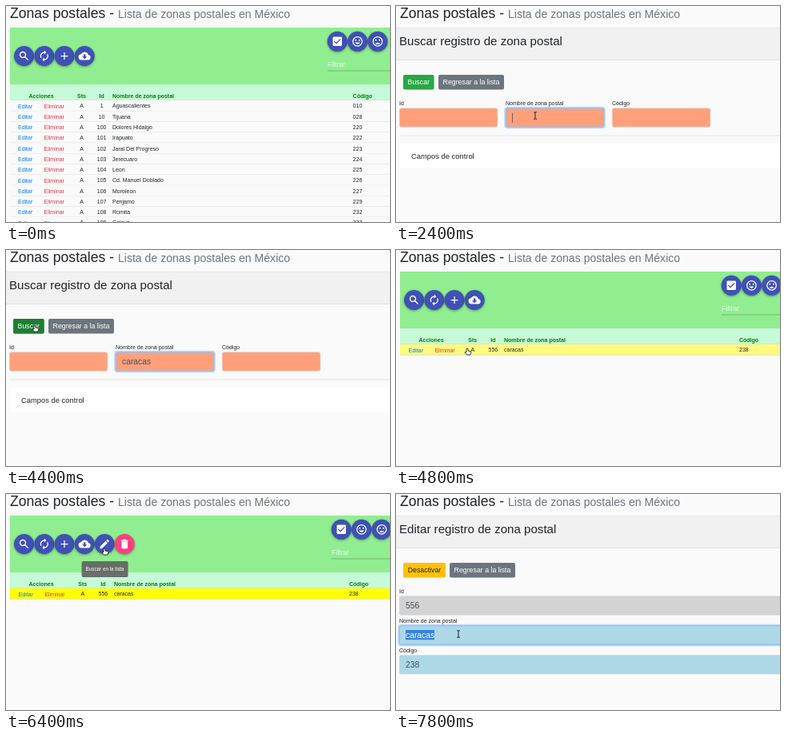
An HTML page that plays this animation: 480 by 270 pixels, repeating every 8000 ms.

```html
<!DOCTYPE html>
<html lang="es">
<head>
<meta charset="utf-8">
<title>Zonas postales</title>
<style>
html, body { margin: 0; height: 100%; overflow: hidden; background: #fafafa; }
svg { display: block; width: 100vw; height: 100vh; font: 7px "Liberation Sans", Arial, sans-serif; fill: #212529; }
.mid { text-anchor: middle; }
.head { font-weight: bold; fill: #008000; }
.edit { fill: #007bff; }
.drop { fill: #dc3545; }
.value { font-size: 10.3px; fill: #495057; }
.button { font-size: 8.8px; }
.fab { filter: drop-shadow(0 1.5px 1.5px #0006); }
.focus { fill: none; stroke: #80bdff; }
.ring { fill: none; stroke: #007bff40; stroke-width: 2; }

/* One shared 8 s loop: 1% = 80 ms */
.cut { opacity: 0; animation: 8s step-end infinite; }
.fade { opacity: 0; animation: 8s linear infinite; }
#all { animation-name: all; }
#search { animation-name: search; }
#found { animation-name: found; }
#editor { animation-name: editor; }
@keyframes all { 0% { opacity: 1 } 20%, 100% { opacity: 0 } }
@keyframes search { 0% { opacity: 0 } 20% { opacity: 1 } 56.25%, 100% { opacity: 0 } }
@keyframes found { 0% { opacity: 0 } 56.25% { opacity: 1 } 81.25%, 100% { opacity: 0 } }
@keyframes editor { 0% { opacity: 0 } 81.25%, 100% { opacity: 1 } }

.tip1 { animation-name: tip1; }
.tip2 { animation-name: tip2; }
.pressed { animation-name: pressed; }
.nameFocus { animation-name: nameFocus; }
.caret { animation-name: caret; }
.submit { animation-name: submit; }
.tools { animation-name: tools; }
.editFocus { animation-name: editFocus; }
.selection { animation-name: selection; }
@keyframes tip1 { 0%, 11.5% { opacity: 0 } 13%, 100% { opacity: 1 } }
@keyframes tip2 { 0%, 76% { opacity: 0 } 78%, 100% { opacity: 1 } }
@keyframes pressed { 0%, 13.5% { opacity: 0 } 14.5%, 100% { opacity: 1 } }
@keyframes nameFocus { 0%, 28.8% { opacity: 0 } 30%, 100% { opacity: 1 } }
@keyframes caret { 0% { opacity: 0 } 29% { opacity: 1 } 35.8%, 100% { opacity: 0 } }
@keyframes submit { 0%, 48.5% { opacity: 0 } 50.5%, 100% { opacity: 1 } }
@keyframes tools { 0%, 63.5% { opacity: 0 } 65%, 100% { opacity: 1 } }
@keyframes editFocus { 0%, 94% { opacity: 0 } 96%, 100% { opacity: 1 } }
@keyframes selection { 0% { opacity: 0 } 95.8%, 100% { opacity: 1 } }

.typed { fill-opacity: 0; animation: typed 8s step-end infinite; }
@keyframes typed { 0% { fill-opacity: 1 } 60%, 100% { fill-opacity: 0 } }

.row { animation: row 8s linear infinite; }
@keyframes row {
  0%, 59% { fill: #fafafa }
  60%, 70.5% { fill: #fffa7d }
  72%, 100% { fill: #ff0 }
}

#pointer { animation: move 8s ease-in-out infinite; }
@keyframes move {
  0%, 3.3% { transform: translate(112px, 280px) }
  11.3%, 14.1% { transform: translate(24px, 64px) }
  17%, 22% { transform: translate(73.5px, 84px) }
  24%, 25% { transform: translate(71px, 95px) }
  29%, 45.8% { transform: translate(174px, 137px) }
  49.1%, 58.2% { transform: translate(36px, 94px) }
  59.8%, 70% { transform: translate(89px, 123px) }
  75%, 85% { transform: translate(123px, 68px) }
  90.5%, 100% { transform: translate(78px, 175px) }
}
#arrow { animation-name: arrow; }
#hand { animation-name: hand; }
#beam { animation-name: beam; }
@keyframes arrow { 0% { opacity: 1 } 10.5% { opacity: 0 } 81.25% { opacity: 1 } 89.5%, 100% { opacity: 0 } }
@keyframes hand { 0% { opacity: 0 } 10.5% { opacity: 1 } 27.5% { opacity: 0 } 48% { opacity: 1 } 81.25%, 100% { opacity: 0 } }
@keyframes beam { 0% { opacity: 0 } 27.5% { opacity: 1 } 48% { opacity: 0 } 89.5%, 100% { opacity: 1 } }
</style>
</head>
<body>
<svg viewBox="0 0 480 270" preserveAspectRatio="none">
  <defs>
    <g id="find" fill="none" stroke="#fff" stroke-width="2.2"><circle cx="9.5" cy="9.5" r="5.5"/><path d="M13.5 13.5l6.3 6.3"/></g>
    <path id="renew" d="M12 6v3l4-4-4-4v3c-4.42 0-8 3.58-8 8 0 1.57.46 3.03 1.24 4.26L6.7 14.8A6 6 0 0 1 12 6zm6.76 1.74L17.3 9.2A6 6 0 0 1 12 18v-3l-4 4 4 4v-3c4.42 0 8-3.58 8-8 0-1.57-.46-3.03-1.24-4.26z"/>
    <path id="add" d="M19 13h-6v6h-2v-6H5v-2h6V5h2v6h6z"/>
    <path id="cloud" d="M19.35 10.04A7.5 7.5 0 0 0 5.35 8.04 6 6 0 0 0 6 20h13a5 5 0 0 0 .35-9.96zM17 13l-5 5-5-5h3V9h4v4z"/>
    <path id="check" d="M19 3H5a2 2 0 0 0-2 2v14a2 2 0 0 0 2 2h14a2 2 0 0 0 2-2V5a2 2 0 0 0-2-2zm-9 14l-5-5 1.4-1.4 3.6 3.6 7.6-7.6L19 8z"/>
    <g id="face"><circle cx="12" cy="12" r="9" fill="none" stroke="#fff" stroke-width="2"/><circle cx="8.5" cy="9.5" r="1.5"/><circle cx="15.5" cy="9.5" r="1.5"/></g>
    <g id="happy"><use href="#face"/><path d="M7 14a5.5 5.5 0 0 0 10 0z"/></g>
    <g id="sad"><use href="#face"/><path d="M7 17.5a5.5 5.5 0 0 1 10 0z"/></g>
    <path id="pencil" d="M3 17.25V21h3.75L17.8 9.94 14.06 6.2zM20.7 7.04a1 1 0 0 0 0-1.4L18.37 3.3a1 1 0 0 0-1.4 0l-1.84 1.83 3.75 3.75z"/>
    <path id="bin" d="M6 19a2 2 0 0 0 2 2h8a2 2 0 0 0 2-2V7H6zM19 4h-3.5l-1-1h-5l-1 1H5v2h14z"/>
  </defs>
  <rect width="480" height="270" fill="#fafafa"/>
  <text x="5" y="15" font-size="17.6">Zonas postales - <tspan font-size="14.08" fill="#6c757d">Lista de zonas postales en México</tspan></text>
  <g id="all" class="cut"></g>
  <g id="search" class="cut"></g>
  <g id="found" class="cut"></g>
  <g id="editor" class="cut"></g>
  <g id="pointer" stroke-linejoin="round">
    <path id="arrow" class="cut" d="M0 0v8l2-1.8 1.3 3 1.3-.6-1.3-2.9H6z" fill="#222" stroke="#fff" stroke-width=".6"/>
    <path id="hand" class="cut" d="M-1 .6Q0-.6 1 .6V3l3.4.8Q5 4 4.8 5L4 8H-.6L-3 5q0-1.2 2 0z" fill="#fff" stroke="#222" stroke-width=".9"/>
    <path id="beam" class="cut" d="M-2-4.2h1.4L0-3.6l.6-.6H2M0-3.6v7.2M-2 4.2h1.4L0 3.6l.6.6H2" fill="none" stroke="#333" stroke-width="1.1"/>
  </g>
</svg>
<script>
const text = (x, y, content, attrs = '') => `<text x="${x}" y="${y}" ${attrs}>${content}</text>`;
const rect = (x, y, w, h, fill, attrs = '') =>
  `<rect x="${x}" y="${y}" width="${w}" height="${h}" fill="${fill}" ${attrs}/>`;
const line = (x, y, color) => rect(x, y - .4, 480 - x, .8, color);

const fab = (x, y, icon, color = '#3f51b5') =>
  `<circle class="fab" cx="${x}" cy="${y}" r="12.5" fill="${color}"/>
   <use href="#${icon}" fill="#fff" transform="translate(${x - 7.6} ${y - 7.6}) scale(.635)"/>`;

const tooltip = (x, name) => `<g class="fade ${name}">
  ${rect(x - 29, 84, 58, 20, '#616161e8', 'rx="2"')}
  ${text(x, 96.2, 'Buscar en la lista', 'class="mid" font-size="6.3" fill="#fff"')}</g>`;

const button = (x, w, label, fill, color = '#fff', shade = '') =>
  rect(x, 86, w, 18.4, fill, 'rx="2"') + shade +
  text(x + w / 2, 98.2, label, `class="button mid" fill="${color}"`);

const field = (x, y, w, label, fill, value = '') =>
  text(x, y - 3.8, label) +
  rect(x + .3, y + .3, w, 23.4, fill, 'rx="2.2" stroke="#ced4da" stroke-width=".6"') +
  text(x + 8, y + 15.6, value, 'class="value"');

const focusRing = (x, y, w, name) => `<g class="fade ${name}">
  <rect class="ring" x="${x - .8}" y="${y - .8}" width="${w + 2}" height="25.6" rx="3"/>
  <rect class="focus" x="${x + .3}" y="${y + .3}" width="${w}" height="23.4" rx="2.2"/></g>`;

const heading = title => rect(0, 27, 480, 40.5, '#f1f1f1') + line(0, 27.2, '#e4e4e4') +
  line(0, 67.5, '#d8d8d8') + text(4, 49, title, 'font-size="15.1"');

// Both lists share a layout; the columns sit a little differently.
function list(rows, { sts, id, name, code, link, filter }, rowClass = '') {
  const tableRow = ([key, zone, number], i) => {
    const y = 118 + 13.28 * i, base = y + 9.6;
    return rect(5, y, 475, 13.28, '#fafafa', `class="${rowClass}"`) + line(5, y + 13.28, '#d9d9d9') +
      text(link, base, 'Editar', 'class="edit"') + text(link + 32.6, base, 'Eliminar', 'class="drop"') +
      text(sts, base - .2, 'A', 'class="mid"') + text(id, base - .2, key, 'class="mid"') +
      text(name, base - .2, zone) + text(code, base - .2, number);
  };
  return rect(5, 27, 475, 71, '#90ee90') + rect(5, 98, 475, 20, '#c6fad8') +
    line(5, 118, '#cfd8d2') +
    ['find', 'renew', 'add', 'cloud'].map((icon, i) => fab(22.6 + 25.2 * i, 62.5, icon)).join('') +
    ['check', 'happy', 'sad'].map((icon, i) => fab(filter + 12.2 + 25.2 * i, 44.3, icon)).join('') +
    text(filter, 76, 'Filtrar', 'font-size="8.6" fill="#fff" fill-opacity=".8"') +
    line(filter, 81, '#6fa86f') +
    text(44, 115.4, 'Acciones', 'class="head mid"') + text(sts, 115.4, 'Sts', 'class="head mid"') +
    text(id, 115.4, 'Id', 'class="head mid"') + text(name, 115.4, 'Nombre de zona postal', 'class="head"') +
    text(code, 115.4, 'Código', 'class="head"') + rows.map(tableRow).join('');
}

const zones = [
  [1, 'Aguascalientes', '010'], [10, 'Tijuana', '028'], [100, 'Dolores Hidalgo', '220'],
  [101, 'Irapuato', '222'], [102, 'Jaral Del Progreso', '223'], [103, 'Jerecuaro', '224'],
  [104, 'Leon', '225'], [105, 'Cd. Manuel Doblado', '226'], [106, 'Moroleon', '227'],
  [107, 'Penjamo', '229'], [108, 'Romita', '232'], [109, 'Celaya', '233']
];
const fill = (id, html) => { document.getElementById(id).innerHTML = html; };

fill('all', list(zones, { sts: 94.5, id: 119.6, name: 133, code: 433.6, link: 15, filter: 402 }) +
  '<circle class="fade pressed" cx="22.6" cy="62.5" r="12.5" fill="#0002"/>' + tooltip(23, 'tip1'));

const letters = [...'caracas'].map((letter, i) =>
  `<tspan class="typed" style="animation-delay:${2870 + 100 * i}ms">${letter}</tspan>`).join('');
fill('search', heading('Buscar registro de zona postal') +
  button(9, 38.6, 'Buscar', '#28a745', '#fff', rect(9, 86, 38.6, 18.4, '#1e7e34', 'rx="2" class="fade submit"')) +
  button(53, 82, 'Regresar a la lista', '#6c757d') +
  field(4, 127.5, 122.6, 'Id', '#ffa07a') +
  field(137, 127.5, 122.6, 'Nombre de zona postal', '#ffa07a', letters) +
  field(270, 127.5, 122.6, 'Código', '#ffa07a') +
  focusRing(137, 127.5, 122.6, 'nameFocus') +
  rect(145, 133.8, .8, 12, '#495057', 'class="cut caret"') +
  line(4, 162, '#e2e2e2') + rect(5, 172, 475, 30, '#fff') +
  text(19, 190.6, 'Campos de control', 'font-size="9.4"'));

fill('found', list([[556, 'caracas', '238']],
  { sts: 95.8, id: 121.4, name: 135, code: 429, link: 15.8, filter: 407 }, 'row') +
  `<g class="fade tools">${fab(123.2, 62.5, 'pencil')}${fab(148.2, 62.5, 'bin', '#ff4081')}</g>` +
  tooltip(123.6, 'tip2'));

fill('editor', heading('Editar registro de zona postal') +
  button(9, 53, 'Desactivar', '#ffc107', '#212529') + button(67, 82, 'Regresar a la lista', '#6c757d') +
  field(4, 127.5, 482, 'Id', '#d3d3d3', '556') +
  field(4, 164.5, 482, 'Nombre de zona postal', '#add8e6', 'caracas') +
  field(4, 201.3, 482, 'Código', '#add8e6', '238') +
  focusRing(4, 164.5, 482, 'editFocus') +
  `<g class="cut selection">${rect(12, 170, 36, 12.2, '#3584e4')}
   ${text(12, 180.1, 'caracas', 'class="value" style="fill:#fff"')}</g>`);
</script>
</body>
</html>
```
